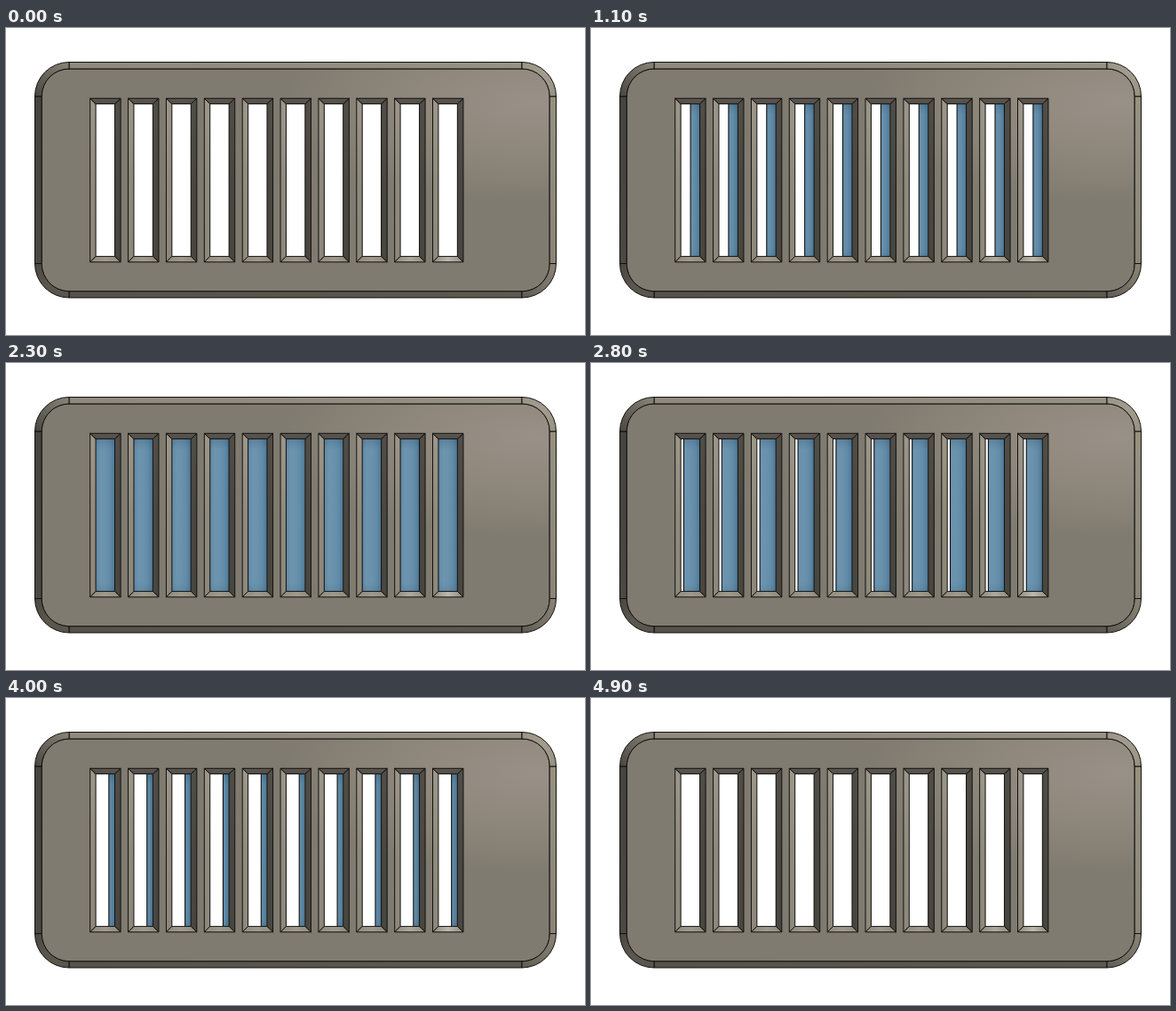
Animation, 652 px wide and 346 px high, one loop 5 s. Source, as an HTML page:

```html
<!DOCTYPE html>
<html lang="en">
<head>
<meta charset="utf-8">
<title>Sliding vent</title>
<style>
  html, body { margin: 0; width: 100%; height: 100%; overflow: hidden; background: #fff; }
  svg { display: block; width: 652px; height: 346px; }
</style>
</head>
<body>
<svg id="stage" viewBox="0 0 652 346">
  <defs>
    <radialGradient id="glow" gradientUnits="userSpaceOnUse" cx="0" cy="0" r="1"
      gradientTransform="translate(596 84) scale(285 112)">
      <stop offset="0" stop-color="#999087"/>
      <stop offset=".45" stop-color="#90887d"/>
      <stop offset="1" stop-color="#807b70"/>
    </radialGradient>
  </defs>
</svg>
<script>
const svg = document.getElementById('stage');
const defs = svg.querySelector('defs');
const INK = '#11110f';

function add(parent, tag, attrs) {
  const el = document.createElementNS('http://www.w3.org/2000/svg', tag);
  for (const key in attrs) el.setAttribute(key, attrs[key]);
  return parent.appendChild(el);
}

// Gradient between two points, in user space
let count = 0;
function blend(x1, y1, x2, y2, ...colors) {
  const id = 'g' + count++;
  const g = add(defs, 'linearGradient', { id, gradientUnits: 'userSpaceOnUse', x1, y1, x2, y2 });
  colors.forEach((c, i) => add(g, 'stop', { offset: i / (colors.length - 1), 'stop-color': c }));
  return `url(#${id})`;
}

function shape(parent, d, fill, width = 1) {
  return add(parent, 'path', { d, fill, stroke: INK, 'stroke-width': width, 'stroke-linejoin': 'round' });
}

// Plate: outer edge, inner edge, and the corner centres
const L = 32.5, R = 619.5, T = 38.5, B = 304;
const l = 40.2, r = 612.2, t = 46, b = 296.8;
const cl = 71, cr = 581, ct = 77, cb = 265.5;

function drawPlate() {
  shape(svg, `M${cl} ${t}H${cr}A31 31 0 0 1 ${r} ${ct}V${cb}A31 31 0 0 1 ${cr} ${b}H${cl}A31 31 0 0 1 ${l} ${cb}V${ct}A31 31 0 0 1 ${cl} ${t}Z`, 'url(#glow)');
  shape(svg, `M${cl} ${T}H${cr}V${t}H${cl}Z`, blend(cl, 0, cr, 0, '#8e897c', '#918c7f', '#979185'));
  shape(svg, `M${cl} ${b}H${cr}V${B}H${cl}Z`, blend(cl, 0, cr, 0, '#575249', '#59544c', '#5d5850'));
  shape(svg, `M${L} ${ct}H${l}V${cb}H${L}Z`, blend(0, ct, 0, cb, '#464440', '#484540', '#4c4943'));
  shape(svg, `M${r} ${ct}H${R}V${cb}H${r}Z`, blend(0, ct, 0, cb, '#97917f', '#8f8a7b', '#898475'));
  const corner = (x0, x1, cx, y0, y1, cy, sweep, side, end) =>
    shape(svg, `M${x0} ${cy}A38.5 38.5 0 0 ${sweep} ${cx} ${y0}V${y1}A31 31 0 0 ${1 - sweep} ${x1} ${cy}Z`,
      blend(x0, cy, cx, y0, ...side, end));
  corner(L, l, cl, T, t, ct, 1, ['#4a4741', '#6a665c'], '#8a8578');
  corner(R, r, cr, T, t, ct, 0, ['#97917f', '#a39c8e'], '#9b9588');
  corner(L, l, cl, B, b, cb, 0, ['#4a4741', '#5b574e'], '#5a554c');
  corner(R, r, cr, B, b, cb, 1, ['#898475', '#787367'], '#605b52');
}

// Slots: outer rim and window, relative to each slot's left side
const COUNT = 10, PITCH = 42.87, FIRST = 94.7;
const W = 34.4, wl = 6.4, wr = 27.8;
const top0 = 79.3, top1 = 85.6, bot1 = 257.4, bot0 = 263.8;
const panels = [];

function drawSlots() {
  const lit = blend(0, top0, 0, bot0, '#9d978a', '#8f8a7d', '#8d887b');
  const shade = blend(0, top0, 0, bot0, '#514d47', '#4a4641', '#494640');
  const upper = blend(0, top0, 0, top1, '#5c5750', '#514c46');
  const blue = blend(wl, 0, wr, 0, '#6089a5', '#6c94af', '#6a92ad', '#628ba7', '#4c7998');
  const dim = add(defs, 'linearGradient', { id: 'dim', x1: 0, y1: 0, x2: 0, y2: 1 });
  [[0, .22], [.07, 0], [.94, 0], [1, .12]].forEach(([offset, o]) =>
    add(dim, 'stop', { offset, 'stop-color': '#234761', 'stop-opacity': o }));
  const clip = add(defs, 'clipPath', { id: 'window' });
  const box = { x: wl, y: top1, width: wr - wl, height: bot1 - top1 };
  add(clip, 'rect', box);

  for (let i = 0; i < COUNT; i++) {
    const g = add(svg, 'g', { transform: `translate(${FIRST + i * PITCH} 0)` });
    const glint = i < 8 ? '#a09a8c' : i < 9 ? '#aeaa9e' : '#bcb9ae';
    add(g, 'rect', { ...box, fill: '#fff' });
    const view = add(g, 'g', { 'clip-path': 'url(#window)' });
    const panel = add(view, 'g', {});
    const face = add(panel, 'rect', { y: top1, height: bot1 - top1, fill: blue });
    const veil = add(panel, 'rect', { y: top1, height: bot1 - top1, fill: 'url(#dim)' });
    const edge = add(panel, 'path', { stroke: INK, 'stroke-width': 1.1 });
    panels.push({ panel, face, veil, edge });
    shape(g, `M0 ${top0}L${wl} ${top1}V${bot1}L0 ${bot0}Z`, lit);
    shape(g, `M${W} ${top0}L${wr} ${top1}V${bot1}L${W} ${bot0}Z`, shade);
    shape(g, `M0 ${top0}H${W}L${wr} ${top1}H${wl}Z`, upper);
    shape(g, `M0 ${bot0}H${W}L${wr} ${bot1}H${wl}Z`, blend(0, 0, W, 0, '#8f8a7c', glint, '#8f8a7c'));
  }
}

// The panel glides left at constant speed, then back
const LOOP = 5000, STEP = 100, TURN = 2350, SPEED = 0.0095;

function render(ms) {
  const time = Math.floor((ms % LOOP) / STEP) * STEP;
  const travel = Math.max(0, TURN - Math.abs(time - TURN)) * SPEED;
  const x = wr - travel;
  for (const { panel, face, veil, edge } of panels) {
    panel.setAttribute('visibility', travel > 0 ? 'visible' : 'hidden');
    for (const part of [face, veil]) {
      part.setAttribute('x', x);
      part.setAttribute('width', travel);
    }
    edge.setAttribute('d', `M${x} ${top1}V${bot1}`);
  }
}

drawPlate();
drawSlots();
render(0);
const start = performance.now();
function tick() {
  render(performance.now() - start);
  requestAnimationFrame(tick);
}
requestAnimationFrame(tick);
</script>
</body>
</html>
```
